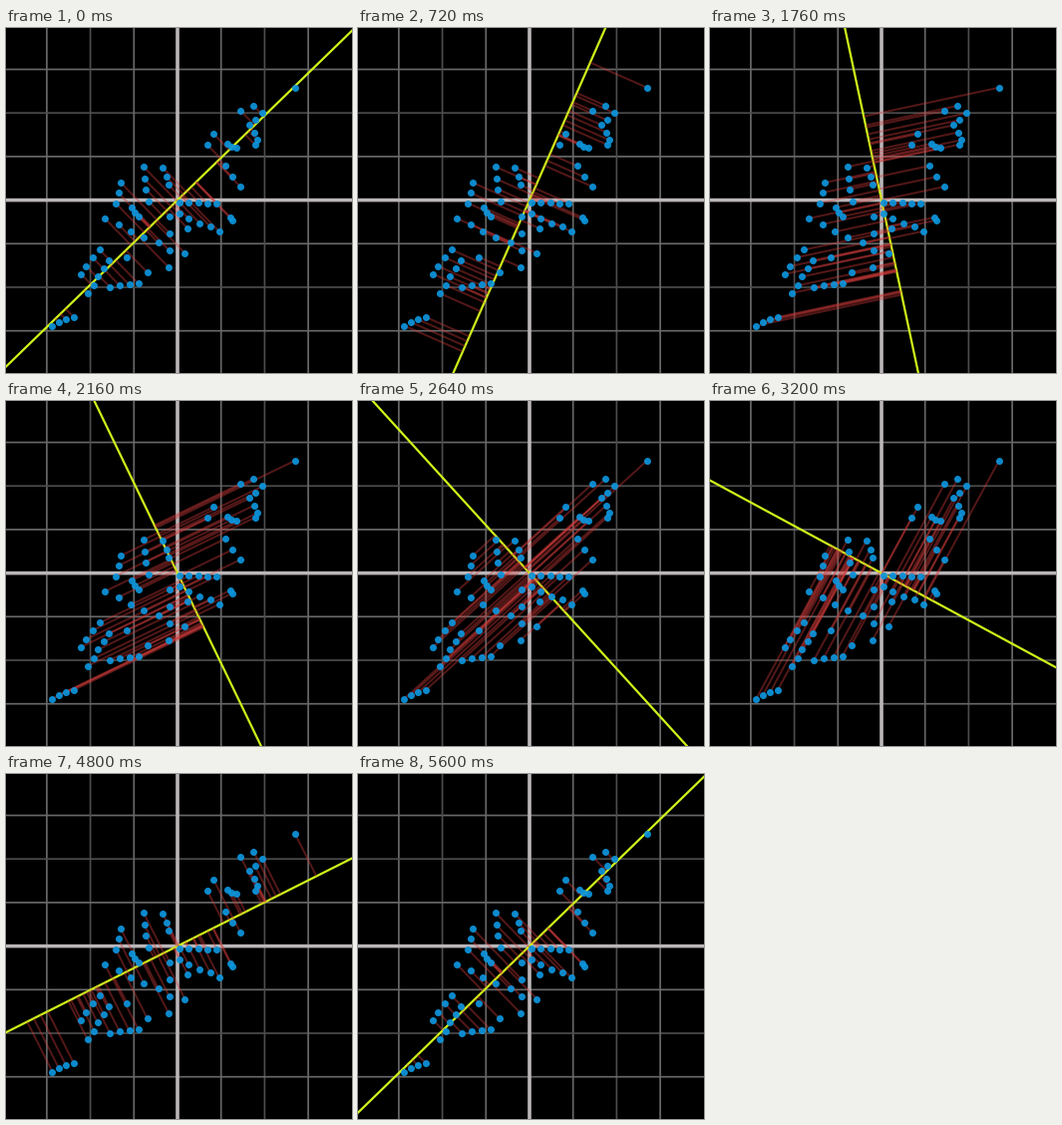
These frames come from a looping animation (347x346 px, 5.68 s). A matplotlib script:

```python
import numpy as np
import matplotlib.pyplot as plt
from matplotlib.animation import FuncAnimation
from matplotlib.collections import LineCollection

W, H, DPI = 347, 346, 100
PX = 72 / DPI                      # one pixel in points
FRAMES, INTERVAL = 71, 80
CENTER = np.array([172, 172.6])
CELL = 43.7
START, STEP = 44.16, 2.755         # degrees, degrees per frame

# The samples fall on short strands: ends of each strand by sample count
STRANDS = {
    5: [((82, 266), (104, 233)), ((99, 190), (153, 216)),
        ((174, 175), (211, 177)), ((174, 186), (214, 204))],
    4: [((46, 298), (68, 290)), ((74, 247), (94, 222)),
        ((105, 259), (132, 256)), ((138, 139), (142, 174)),
        ((165, 188), (164, 241)), ((249, 78), (250, 117))],
    3: [((116, 156), (110, 176)), ((125, 180), (133, 189)),
        ((157, 140), (163, 157)), ((220, 138), (235, 159)),
        ((222, 116), (231, 121)), ((235, 84), (252, 111))],
    2: [((181, 201), (179, 225)), ((224, 190), (227, 192)),
        ((202, 117), (208, 107)), ((258, 87), (290, 59)),
        ((122, 229), (141, 245))],
}


def make_samples():
    strands = [np.linspace(a, b, n)
               for n, ends in STRANDS.items() for a, b in ends]
    pts = np.vstack(strands)
    return pts + np.random.default_rng(4).normal(0, 0.6, pts.shape)


def draw_grid(ax):
    for k in (-3, -2, -1, 1, 2, 3):
        color = "#4c4c4c" if abs(k) == 2 else "#686868"
        style = dict(color=color, lw=1.7 * PX, zorder=1, snap=False)
        ax.axvline(CENTER[0] + k * CELL, **style)
        ax.axhline(CENTER[1] + k * CELL, **style)
    style = dict(color="#bab5b8", lw=3.6 * PX, zorder=2, snap=False)
    ax.axvline(CENTER[0], **style)
    ax.axhline(CENTER[1], **style)


fig = plt.figure(figsize=(W / DPI, H / DPI), dpi=DPI, facecolor="black")
ax = fig.add_axes([0, 0, 1, 1])
ax.set_xlim(0, W)
ax.set_ylim(H, 0)
ax.axis("off")

samples = make_samples()
draw_grid(ax)
axis_line, = ax.plot([], [], color="#d0f51a", lw=2.2 * PX, zorder=3)
residuals = LineCollection([], colors="#d23c3c", alpha=0.4,
                           linewidths=2 * PX, capstyle="butt", zorder=4)
ax.add_collection(residuals, autolim=False)
ax.scatter(*samples.T, s=(7 * PX) ** 2, color="#0c96de",
           alpha=0.92, linewidths=0, zorder=5)


def update(i):
    # Short rest at both ends, steady half turn between them
    angle = np.radians(START + min(STEP * max(i - 1, 0), 180))
    d = np.array([np.cos(angle), -np.sin(angle)])
    ends = CENTER + np.outer([-300, 300], d)
    axis_line.set_data(ends[:, 0], ends[:, 1])
    feet = CENTER + np.outer((samples - CENTER) @ d, d)
    residuals.set_segments(np.stack([samples, feet], axis=1))
    return axis_line, residuals


anim = FuncAnimation(fig, update, frames=FRAMES, interval=INTERVAL,
                     repeat=True, repeat_delay=0, blit=False)
plt.show()
```
